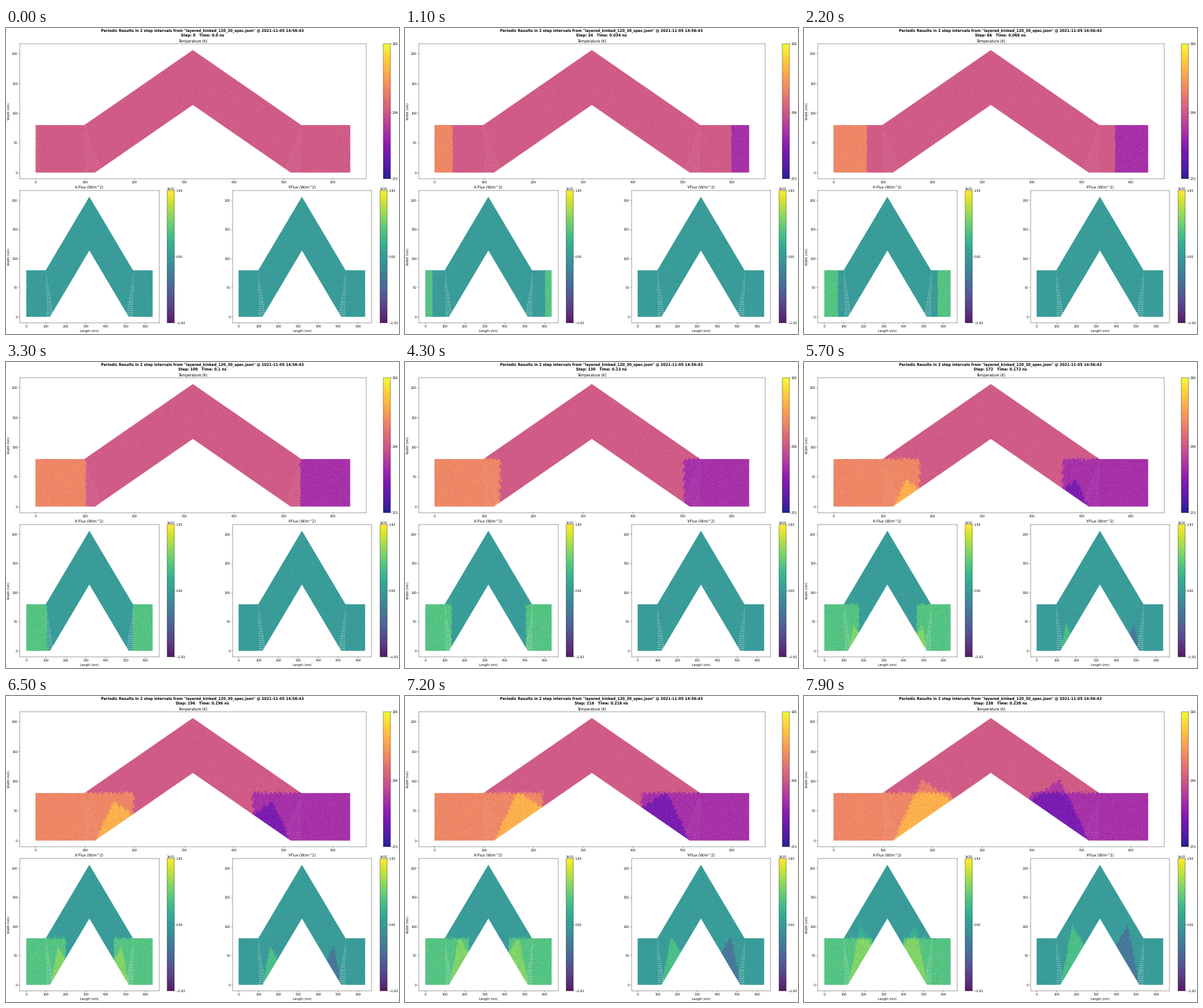
A matplotlib script for the animation above (8 s loop, 600 by 467 pixels).

```python
import numpy as np
import matplotlib.pyplot as plt
from matplotlib.animation import FuncAnimation
from matplotlib.cm import ScalarMappable
from matplotlib.colors import Normalize
from matplotlib.patches import Polygon

STAGE_W, STAGE_H, DPI = 600, 467, 32
FRAMES, INTERVAL = 80, 100

plt.rcParams.update({
    "font.family": "DejaVu Sans", "font.size": 10.417,
    "axes.linewidth": 0.83, "text.hinting": "none",
})

# Kinked channel: horizontal ends, then a 30 degree rise to the middle (nm)
HALF, END, THICK = 317.3, 120.0, 80.0
LENGTH = 2 * HALF
SLOPE = np.tan(np.pi / 6)
C30, S30 = np.cos(np.pi / 6), 0.5
TOP_END = END - THICK * np.tan(np.pi / 12)
NOTCH = (HALF - END) * SLOPE
PEAK = NOTCH + THICK / C30
OUTLINE = [(0, 0), (0, THICK), (TOP_END, THICK), (HALF, PEAK),
           (LENGTH - TOP_END, THICK), (LENGTH, THICK), (LENGTH, 0),
           (LENGTH - END, 0), (HALF, NOTCH), (END, 0)]

# Cell grid; x is folded about the middle because both ends mirror each other
NX, NY = 488, 188
x, y = np.meshgrid((np.arange(NX) + 0.5) * LENGTH / NX,
                   (np.arange(NY) + 0.5) * PEAK / NY)
fold = np.minimum(x, LENGTH - x)
side = np.where(x < HALF, 1, -1)


def snap(v, size):
    return (np.floor(v / size) + 0.5) * size


# Mesh cells follow the tilt of the channel beyond the first kink
along = snap((fold - END) * C30 + y * S30, 7)
across = snap(-(fold - END) * S30 + y * C30, 5)
tilted = fold > END - y * (END - TOP_END) / THICK
cell_x = np.where(tilted, END + along * C30 - across * S30, snap(fold, 1.5))
cell_y = np.where(tilted, along * S30 + across * C30, y)


def mesh_alpha(fan_strength):
    """Opacity of the cells, thinner in the fan of slivers at each kink."""
    rng = np.random.default_rng(5)
    drop = np.clip((THICK - y) / THICK, 0.01, 1)
    w = (fold - TOP_END - 2 * drop) / (35 * drop)
    fan = (w >= 0) & (w <= 1) & (y < THICK)
    stripes = (y % 3.3 < 1.3) * (0.5 + 0.5 * np.abs(2 * w - 1))
    alpha = 0.91 - 0.06 * rng.random(x.shape) ** 2
    return np.clip(alpha - fan_strength * fan * stripes, 0, 1)


def waves(step, rng):
    """Cells reached by the straight beam and by its 60 degree reflection."""
    cx = cell_x + rng.normal(0, 0.7, x.shape)
    cy = cell_y + rng.normal(0, 0.7, x.shape)
    direct = (cx < step + 1.5) & (cy < THICK + 0.5)
    # Trace each cell back along the reflected ray to the lower wall
    dx = cx - END
    path = (cy - dx * SLOPE) / (C30 - S30 * SLOPE)
    hit = dx - path * S30
    reflected = (hit > 0) & (hit + path < step - END)
    return direct.astype(float), reflected.astype(float)


def fields(step):
    rng = np.random.default_rng(1000 + step)
    direct, reflected = waves(step, rng)

    def noisy(v, grain):
        return (0.5 + v * (1 + 0.1 * rng.normal(size=v.shape))
                + grain * rng.normal(size=v.shape))

    return (noisy(side * (0.165 * direct + 0.135 * reflected), 0.014),
            noisy(0.19 * direct + 0.095 * reflected, 0.014),
            noisy(side * 0.165 * reflected, 0.014))


fig = plt.figure(figsize=(STAGE_W / DPI, STAGE_H / DPI), dpi=DPI,
                 facecolor="white")


def px_axes(left, top, right, bottom):
    return fig.add_axes([left / STAGE_W, 1 - bottom / STAGE_H,
                         (right - left) / STAGE_W, (bottom - top) / STAGE_H])


def panel(box, title, cmap, fan, bar_left, lo, hi, ticks, fmt):
    ax = px_axes(*box)
    im = ax.imshow(np.full(x.shape, 0.5), cmap=cmap, vmin=0, vmax=1,
                   extent=(0, LENGTH, 0, PEAK), origin="lower",
                   aspect="auto", interpolation="nearest",
                   alpha=mesh_alpha(fan))
    im.set_clip_path(Polygon(OUTLINE, transform=ax.transData))
    ax.set(xlim=(-0.05 * LENGTH, 1.05 * LENGTH),
           ylim=(-0.05 * PEAK, 1.05 * PEAK),
           xticks=range(0, 601, 100), yticks=range(0, 201, 50))
    ax.set_title(title)
    cax = px_axes(bar_left, box[1], bar_left + 11, box[3])
    fig.colorbar(ScalarMappable(Normalize(lo, hi), cmap), cax=cax,
                 ticks=ticks, format=fmt, alpha=0.9)
    return ax, cax, im


FLUX = dict(cmap="viridis", fan=0.45, lo=-1.93, hi=1.93,
            ticks=[-1.93, 0, 1.93],
            fmt=lambda v, _: f"{v:.2f}".replace("-", "\u2212"))
ax_t, _, im_t = panel((21, 24.3, 549.5, 230), "Temperature (K)", "plasma",
                      0.12, 575.8, 273, 326, [273, 299, 326], "%d")
ax_x, bar_x, im_x = panel((21, 248.3, 233.5, 450), "X-Flux (W/m^2)",
                          bar_left=245.7, **FLUX)
ax_y, bar_y, im_y = panel((345.5, 248.3, 558, 450), "Y-Flux (W/m^2)",
                          bar_left=570.5, **FLUX)
for ax in (ax_t, ax_x):
    ax.set_ylabel("Width (nm)")
for ax in (ax_x, ax_y):
    ax.set_xlabel("Length (nm)")
for bar in (bar_x, bar_y):
    bar.text(0, 1.008, "1e10", transform=bar.transAxes)

HEAD = ('Periodic Results in 2 step intervals from '
        '"layered_kinked_120_30_spec.json" @ 2021-11-05 14:56:43')
title = fig.suptitle("", y=1 - 1.4 / STAGE_H, va="top", weight="bold",
                     fontsize="large")


def update(i):
    step = 2 * ((3 * i + 1) // 2)
    for im, data in zip((im_t, im_x, im_y), fields(step)):
        im.set_data(data)
    title.set_text(f"{HEAD}\nStep: {step}   Time: {round(step / 1000, 3)} ns")
    return im_t, im_x, im_y, title


anim = FuncAnimation(fig, update, frames=FRAMES, interval=INTERVAL,
                     repeat=True, repeat_delay=0, blit=False)
plt.show()
```
